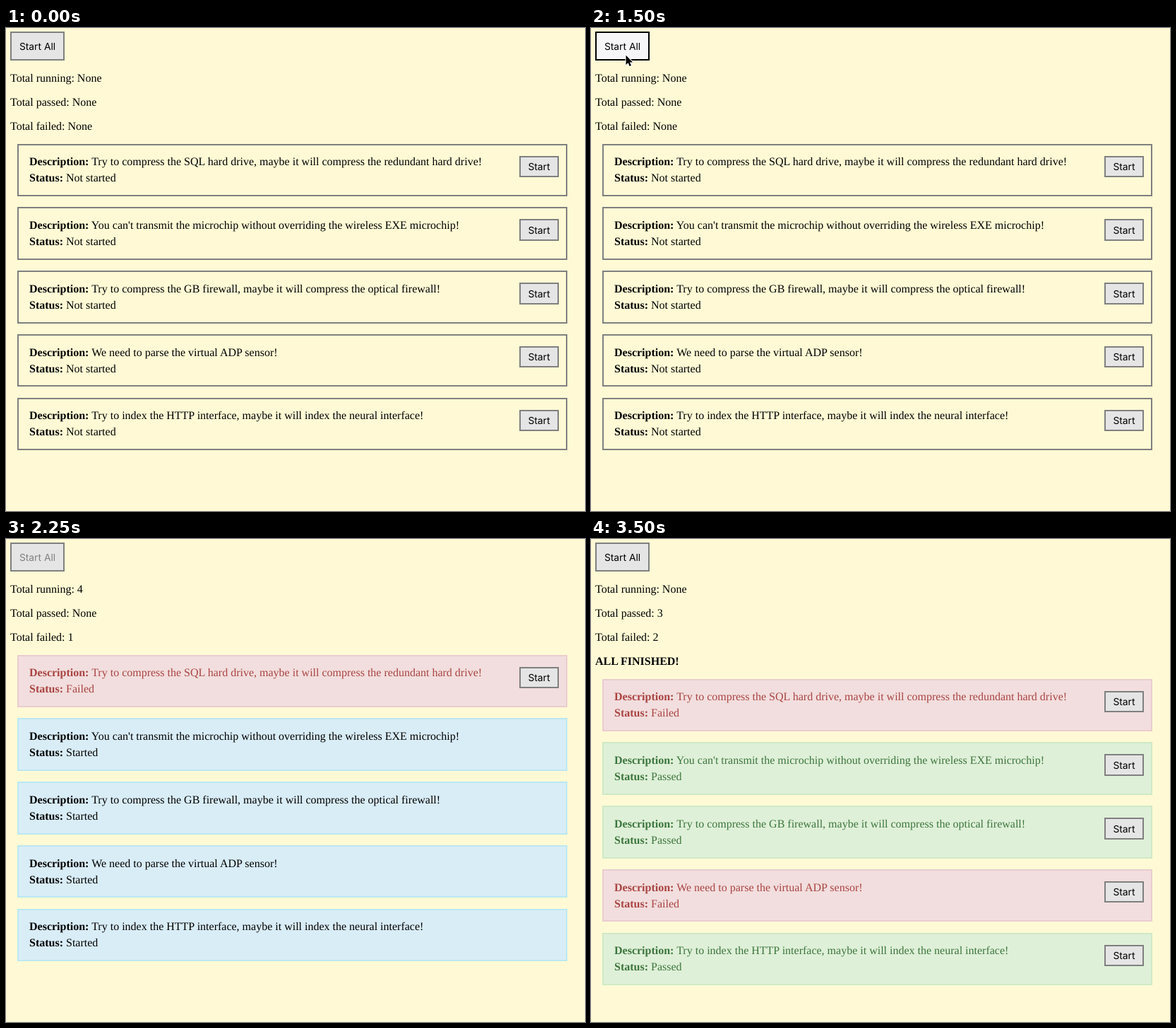
Animation, 820 px wide and 683 px high, one loop 4.5 s. Source, as an HTML page:

```html
<!DOCTYPE html>
<html lang="en">
<head>
<meta charset="utf-8">
<title>Task runner</title>
<style>
html, body { margin: 0; width: 100%; height: 100%; overflow: hidden; background: #fffad5; }
svg { display: block; width: 820px; height: 683px; }
text { font: 16px "Liberation Serif", "Times New Roman", serif; text-rendering: geometricPrecision; white-space: pre; }
.b { font-weight: bold; }
.btn { font: 13.8px Inter, sans-serif; text-anchor: middle; }
</style>
</head>
<body>
<svg id="stage" viewBox="0 0 820 683"></svg>
<script>
const stage = document.getElementById('stage');
const LOOP = 4500, TICK = 250, PITCH = 89.75;

const tasks = [
  { text: 'Try to compress the SQL hard drive, maybe it will compress the redundant hard drive!', end: 2000, result: 'Failed' },
  { text: "You can't transmit the microchip without overriding the wireless EXE microchip!", end: 2500, result: 'Passed' },
  { text: 'Try to compress the GB firewall, maybe it will compress the optical firewall!', end: 2750, result: 'Passed' },
  { text: 'We need to parse the virtual ADP sensor!', end: 3500, result: 'Failed' },
  { text: 'Try to index the HTTP interface, maybe it will index the neural interface!', end: 2500, result: 'Passed' }
];
const START = 1750, DONE = 3500;

const looks = {
  'Not started': { fill: 'none', line: '#808080', ink: '#000' },
  Started: { fill: '#d9edf7', line: '#bce8f1', ink: '#000' },
  Passed: { fill: '#dff0d8', line: '#d0e9c6', ink: '#3c763d' },
  Failed: { fill: '#f2dede', line: '#ebccd1', ink: '#a94442' }
};

// Pointer tip at each tick; it is hidden when there is no entry.
const pointer = {
  250: [719.5, 64], 500: [313.5, 95], 750: [104.5, 69], 1000: [55.5, 41],
  1250: [51, 40], 1500: [49.5, 38.5], 1750: [47.5, 37.5], 2000: [569.5, 179]
};

const box = (x, y, w, h, fill, line) =>
  `<rect x="${x + 1}" y="${y + 1}" width="${w - 2}" height="${h - 2}" fill="${fill}" stroke="${line}" stroke-width="2"/>`;

const label = (x, y, str, cls = '', ink = '#000') =>
  `<text x="${x}" y="${y}" class="${cls}" fill="${ink}">${str}</text>`;

const button = (x, y, w, h, str, { fill = '#e5e5e5', line = '#808080', ink = '#000' } = {}) =>
  box(x, y, w, h, fill, line) + label(x + w / 2, y + h / 2 + 5, str, 'btn', ink);

const field = (x, y, name, value, ink) =>
  label(x, y, `<tspan class="b">${name}:</tspan> ${value}`, '', ink);

function statusAt(task, t) {
  if (t < START) return 'Not started';
  return t < task.end ? 'Started' : task.result;
}

function card(task, status, i, shift) {
  const { fill, line, ink } = looks[status];
  const at = y => Math.round(y + PITCH * i) + shift;
  const top = at(163.6);
  return box(16, top, 779, at(238.15) - top, fill, line) +
    field(33, at(194.3), 'Description', task.text, ink) +
    field(33, at(217.3), 'Status', status, ink) +
    (status === 'Started' ? '' : button(727, at(180.6), 56, at(211.2) - at(180.6), 'Start'));
}

function startAll(t) {
  const ring = t >= START && t < 2250
    ? '<rect x="3" y="2" width="83" height="47" rx="4" fill="none" stroke="#b9d6e6" stroke-width="4"/>' +
      '<rect x="4.5" y="3.5" width="80" height="44" rx="2" fill="none" stroke="#74aeea" stroke-width="3"/>'
    : '';
  let look = {};
  if (t >= 1500 && t < 2000) look = { fill: '#f6f6f8', line: '#000' };
  else if (t >= 2000 && t < DONE) look = { ink: '#808080' };
  return ring + button(6, 5, 77, 41, 'Start All', look);
}

function arrow(t) {
  const tip = pointer[t];
  return tip ? `<path transform="translate(${tip})" d="M0 0V13.6L3.1 10.7 5.1 15.4 7.4 14.4 5.4 9.9H9.6Z"
    fill="#000" stroke="#fff" stroke-width="2" stroke-linejoin="round" paint-order="stroke"/>` : '';
}

function render(t) {
  const states = tasks.map(task => statusAt(task, t));
  const total = s => states.filter(v => v === s).length || 'None';
  const done = t >= DONE;
  stage.innerHTML = '<rect width="820" height="683" fill="#fffad5"/>' +
    startAll(t) +
    label(6, 76, 'Total running: ' + total('Started')) +
    label(6, 110, 'Total passed: ' + total('Passed')) +
    label(6, 144, 'Total failed: ' + total('Failed')) +
    (done ? label(6, 178, 'ALL FINISHED!', 'b') : '') +
    tasks.map((task, i) => card(task, states[i], i, done ? 34 : 0)).join('') +
    arrow(t);
}

const begin = performance.now();
let shown = -1;
function tick() {
  const t = Math.floor((performance.now() - begin) % LOOP / TICK) * TICK;
  if (t !== shown) render(shown = t);
  requestAnimationFrame(tick);
}
tick();
</script>
</body>
</html>
```
